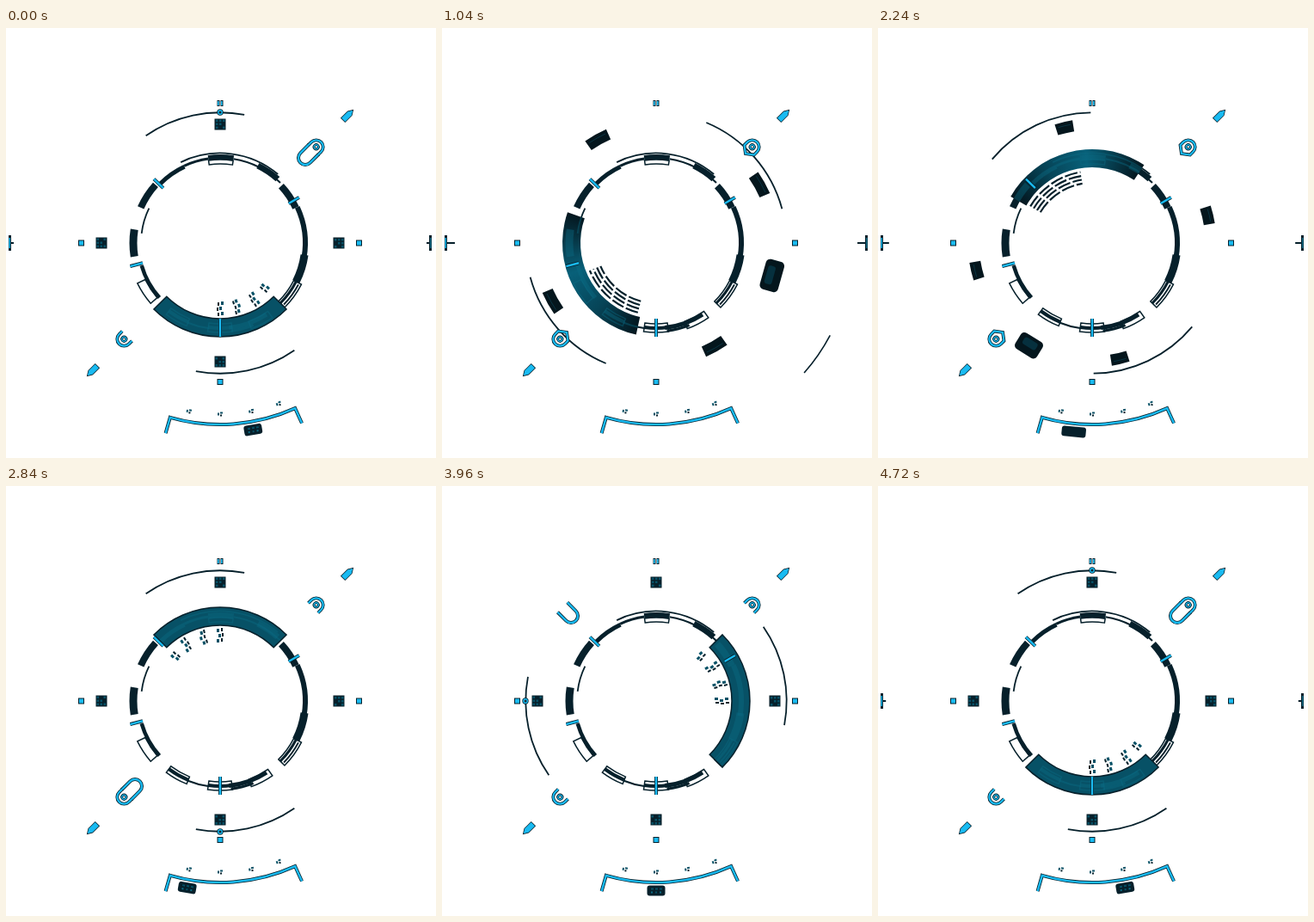
Write an HTML page with a canvas that moves like this. It is 500x500 px and loops after 4.76 s.

```html
<!DOCTYPE html>
<html lang="en">
<head>
<meta charset="utf-8">
<title>Rotating dial</title>
<style>
html, body { margin: 0; width: 100%; height: 100%; overflow: hidden; background: #fff; }
canvas { display: block; width: 500px; height: 500px; }
</style>
</head>
<body>
<canvas id="stage" width="500" height="500"></canvas>
<script>
const ctx = document.getElementById('stage').getContext('2d');
const LOOP = 4760, STEP = 40, MOVE = 600, SHUTTER = 20;
const STARTS = [700, 1840, 3026, 4140];
const INK = '#06202b', TEAL = '#075166', LINE = '#0c6b84', BLUE = '#19bbf2', SHADE = '#04161d';
const rad = d => d * Math.PI / 180;
const lerp = (a, b, p) => a + (b - a) * p;
const clamp = x => Math.max(0, Math.min(1, x));
const ease = x => x < .5 ? 4 * x ** 3 : 1 - 4 * (1 - x) ** 3;

// Number of quarter turns completed at time t
const turns = t => STARTS.reduce((sum, s) => sum + ease(clamp((t - s) / MOVE)), 0);

function polar(r, a) { return [r * Math.cos(rad(a)), r * Math.sin(rad(a))]; }

function arc(r, a0, a1, width = 1.8, color = INK) {
  ctx.beginPath();
  ctx.arc(0, 0, r, rad(a0), rad(a1));
  ctx.lineWidth = width;
  ctx.strokeStyle = color;
  ctx.stroke();
}

function band(r0, r1, a0, a1) {
  ctx.beginPath();
  ctx.arc(0, 0, r1, rad(a0), rad(a1));
  ctx.arc(0, 0, r0, rad(a1), rad(a0), true);
  ctx.closePath();
}

function frame(r0, r1, a0, a1, color = INK) {
  band(r0, r1, a0, a1);
  ctx.lineWidth = 1.5;
  ctx.strokeStyle = color;
  ctx.stroke();
}

// Blue line with a dark edge
function neon(width = 2.4) {
  ctx.lineWidth = width + 1.6;
  ctx.strokeStyle = INK;
  ctx.stroke();
  ctx.lineWidth = width;
  ctx.strokeStyle = BLUE;
  ctx.stroke();
}

// Local axes: x points outward, y along the turn
function at(r, a, draw) {
  ctx.save();
  ctx.rotate(rad(a));
  ctx.translate(r, 0);
  draw();
  ctx.restore();
}

function rect(x, y, w, h, color) {
  ctx.fillStyle = color;
  ctx.fillRect(x, y, w, h);
}

function pill(x, y, w, h, radius, color) {
  ctx.beginPath();
  ctx.roundRect(x, y, w, h, radius);
  ctx.fillStyle = color;
  ctx.fill();
}

function tick(r0, r1, a) {
  at(0, a, () => {
    ctx.beginPath();
    ctx.moveTo(r0, 0);
    ctx.lineTo(r1, 0);
    neon(2.4);
  });
}

function ringParts(color) {
  const line = (r, a0, a1, w) => arc(r, a0, a1, w, color);
  const box = (r0, r1, a0, a1) => frame(r0, r1, a0, a1, color);
  line(104.5, -116, -50);
  line(98, -135, -115, 5);
  line(99, -115, -98, 3);
  line(100, -98, -81, 6);
  box(92, 97, -98, -81);
  line(99, -81, -45, 2);
  line(100, -64, -48, 7);
  line(97, -43, -25, 8);
  line(99, -25, 10, 6);
  line(99, 8, 27, 9);
  box(96, 106, 27, 45);
  line(99, 27, 45, 3);
  line(103, 28, 44, 2);
  box(97, 106, 55, 70);
  line(99, 57, 84, 5);
  line(103, 68, 83, 3);
  box(94, 104, 82, 98);
  line(99, 82, 98, 4);
  line(100, 98, 112, 2);
  line(99, 112, 127, 4);
  box(95, 104, 112, 127);
  line(95, 138, 164, 4.5);
  box(97, 107, 139, 154);
  line(101, 171, 189, 9);
  line(92, 187, 206, 1.8);
  line(101, 204, 222, 8);
}

function dial(angle, blur) {
  const from = angle - 45 - blur / 2, to = angle + 45 + blur / 2;
  ringParts(INK);
  band(88, 109, from, to);
  if (blur > 1) {
    const span = (to - from) / 360;
    const fill = ctx.createConicGradient(rad(from), 0, 0);
    fill.addColorStop(0, '#04171f');
    fill.addColorStop(span * .3, '#064457');
    fill.addColorStop(span * .6, '#086079');
    fill.addColorStop(span, '#04171f');
    fill.addColorStop(1, '#04171f');
    ctx.fillStyle = fill;
  } else ctx.fillStyle = TEAL;
  ctx.fill();
  ctx.save();
  ctx.clip();
  ctx.globalAlpha = .4;
  ringParts(LINE);
  ctx.restore();
  if (blur < 1) frame(88, 109, from, to);
  tick(92, 107, 224);
  tick(93, 108, 165.5);
  tick(92, 106, -30);
  tick(88, 109, 90);
}

function innerLabels(angle, blur) {
  if (blur > 1) {
    ctx.setLineDash([15, 3]);
    for (let i = 0; i < 4; i++) arc(70 + i * 4.5, angle - 46, angle + blur, 2.2);
    ctx.setLineDash([]);
    return;
  }
  [0, 15, 31, 45].forEach((offset, n) => at(0, angle - offset, () => {
    for (let i = 0; i < (n === 3 ? 2 : 3); i++) {
      rect(68 + i * 6, -4 + (i + n) % 2 * 2, 4, 3, TEAL);
      rect(69 + i * 6, 1 + (i + n) % 2, 4, 2, INK);
    }
  }));
}

function gadget(a, blur) {
  if (blur > 1) {
    arc(138, a - 2.2 - blur / 2, a + 2.2 + blur / 2, 13, SHADE);
    arc(140, a - 1 - blur / 2, a + 1 + blur / 2, 1, '#0a3443');
    return;
  }
  at(138, a, () => {
    rect(-6.5, -6.5, 13, 13, INK);
    for (let i = 0; i < 9; i++) {
      if (i % 4 !== 3) rect(-5 + i % 3 * 4, -5 + Math.floor(i / 3) * 4, 2.5, 2.5, TEAL);
    }
  });
}

function orbitArcs(angle, blur) {
  for (const a of [angle - 12, angle + 168]) arc(151.7, a - 22.7 - blur / 2, a + 22.7 + blur / 2);
  if (blur < 1) at(152, angle, () => {
    ctx.beginPath();
    ctx.arc(0, 0, 2.2, 0, 7);
    neon(1.4);
  });
}

function slider(a, blur) {
  at(140, a, () => {
    if (blur > 1) {
      const half = 10 + blur * 1.2;
      pill(-11, -half, 22, half * 2, 5, SHADE);
      pill(-7, -half * .6, 9, half * 1.2, 3, '#06303e');
      return;
    }
    ctx.beginPath();
    ctx.moveTo(14, 8);
    ctx.lineTo(0, 8);
    ctx.arc(0, 0, 8, Math.PI / 2, Math.PI * 1.5);
    ctx.lineTo(14, -8);
    neon();
  });
}

function hook(a, closed) {
  at(158, a, () => {
    ctx.beginPath();
    ctx.moveTo(-5, -8);
    ctx.arc(0, 0, 8, -Math.PI / 2, Math.PI / 2);
    ctx.lineTo(-5, 8);
    if (closed) {
      ctx.lineTo(-11, 0);
      ctx.closePath();
    }
    neon(2.2);
    ctx.beginPath();
    ctx.arc(0, 0, 2.6, 0, 7);
    neon(1.3);
  });
}

function arrow(a) {
  at(210, a, () => {
    ctx.beginPath();
    ctx.moveTo(-7, -2.5);
    ctx.lineTo(3, -2.5);
    ctx.lineTo(7, 0);
    ctx.lineTo(3, 2.5);
    ctx.lineTo(-7, 2.5);
    ctx.closePath();
    neon(1);
    ctx.fillStyle = BLUE;
    ctx.fill();
  });
}

function markers() {
  for (const a of [0, 90, 180]) at(161.5, a, () => {
    rect(-3.5, -3.5, 7, 7, INK);
    rect(-2.5, -2.5, 5, 5, BLUE);
  });
  for (const x of [-3, 1]) {
    rect(x - .5, -166, 3, 7, INK);
    rect(x, -165, 1.6, 5, BLUE);
  }
}

function bottomBracket() {
  ctx.beginPath();
  ctx.moveTo(...polar(230, 106));
  ctx.lineTo(...polar(211, 106));
  ctx.arc(0, 0, 211, rad(106), rad(65.6), true);
  ctx.lineTo(...polar(230, 65.6));
  neon(2.4);
  for (const a of [100.5, 90, 79.5, 70]) at(198.5, a, () => {
    rect(-2, -3, 2, 3, TEAL);
    rect(1, -2, 2, 2, INK);
    rect(-1, 1, 3, 2, TEAL);
  });
}

function readout(progress, blur) {
  const rest = [80, 70, 100, 90, 80], swing = [-30, 0, -13, 0];
  const i = Math.min(3, Math.floor(progress)), p = progress - i;
  const a = lerp(rest[i], rest[i + 1], p) + swing[i] * Math.sin(Math.PI * p);
  if (a < 62) return;
  const half = 10.5 + blur * .9;
  at(220.5, a, () => {
    pill(-6, -half, 12, half * 2, 3, INK);
    if (blur > 1) return;
    for (let k = 0; k < 3; k++) {
      rect(-3, -7 + k * 5, 2, 3, TEAL);
      rect(1, -6 + k * 5, 2, 2, k === 1 ? TEAL : LINE);
    }
  });
}

function outerArc(progress, blur) {
  if (progress < .4 || progress > 1.36) return;
  const a = 125 - 134 * progress, half = 2.6 + blur * .6;
  arc(229, a - half, a + half, 1.6);
}

function sideBrackets(t) {
  if (t > 2400 && t < 4300) return;
  const length = 6 - 3 * Math.cos(t / 680 * Math.PI * 2);
  for (const side of [-1, 1]) {
    ctx.save();
    ctx.scale(side, 1);
    rect(243, -9, 3, 18, INK);
    rect(244, -6, 1.5, 12, side < 0 ? BLUE : LINE);
    rect(243 - length, -1, length, 2, INK);
    ctx.restore();
  }
}

function draw(now) {
  const t = Math.floor(now % LOOP / STEP) * STEP;
  const progress = turns(t), turn = progress * 90;
  const blur = Math.abs(turns(t + SHUTTER / 2) - turns(t - SHUTTER / 2)) * 90;
  ctx.setTransform(1, 0, 0, 1, 0, 0);
  rect(0, 0, 500, 500, '#fff');
  ctx.translate(249, 250);
  orbitArcs(turn - 90, blur);
  dial(turn + 90, blur);
  innerLabels(turn + 90, blur);
  for (let i = 0; i < 4; i++) gadget(turn + i * 90, blur);
  slider(turn - 45, blur);
  for (const a of [-45, 135]) {
    hook(a, blur > 1);
    arrow(a);
  }
  markers();
  bottomBracket();
  readout(progress, blur);
  outerArc(progress, blur);
  sideBrackets(t);
}

const began = performance.now();
function tickClock() {
  draw(performance.now() - began);
  requestAnimationFrame(tickClock);
}
tickClock();
</script>
</body>
</html>
```
